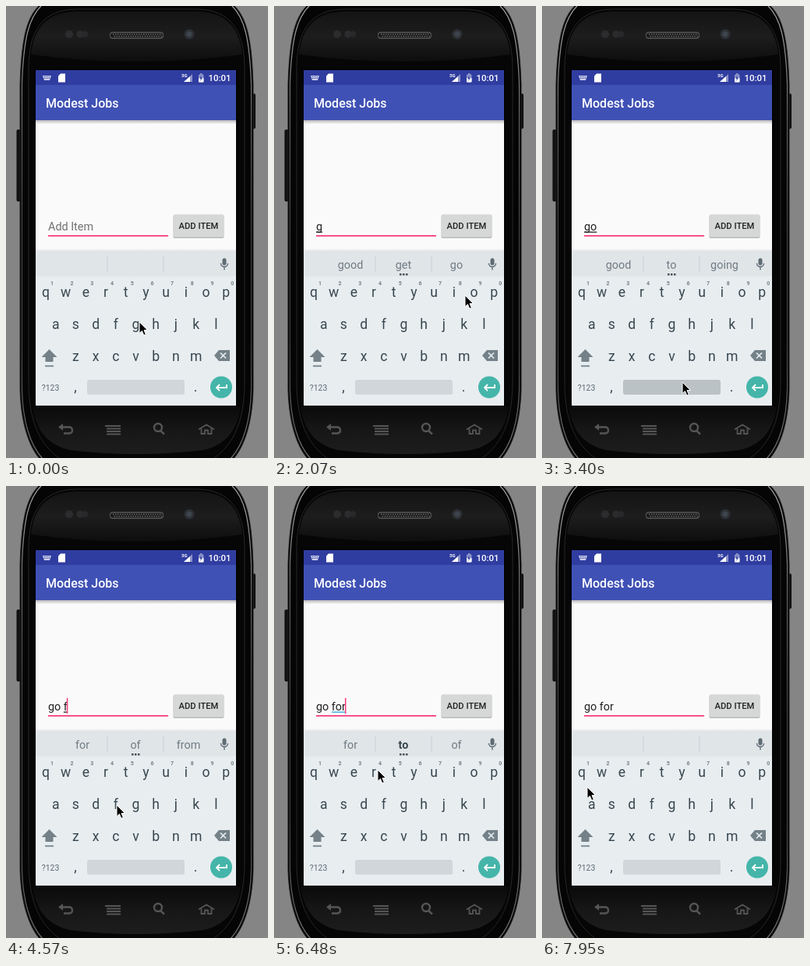
An HTML page with a canvas that plays this animation: 336x578 px, repeating every 8000 ms.

```html
<!DOCTYPE html>
<html lang="en">
<head>
<meta charset="utf-8">
<title>Todo list typing</title>
<style>
html, body { margin: 0; width: 100%; height: 100%; overflow: hidden; background: #858585; }
canvas { display: block; }
</style>
</head>
<body>
<canvas id="stage" width="336" height="578"></canvas>
<script>
const c = document.getElementById('stage').getContext('2d');
const LOOP = 8000, STEP = 147.3, KEY_GAP = 25.7;
const INK = '#37474f', MUTED = '#6f7c83', ICON = '#748188', PINK = '#f83b7c';

// Pointer stops: step, x, y
const pointer = [
  [0, 171, 404], [2, 172, 405], [9, 172, 405], [14, 245, 370], [15, 251, 367],
  [17, 253, 367], [21, 180, 481], [24, 180, 481], [30, 142, 408], [31, 142, 408],
  [34, 257, 364], [36, 257, 364], [39, 121, 364], [41, 133, 363], [45, 133, 363],
  [46, 150, 443], [47, 178, 481], [49, 180, 482], [54, 58, 385]
];
// Step at which each text appears; its key is held during the step before
const typed = [[-4.3, ''], [9, 'g'], [17, 'go'], [24, 'go '], [30, 'go f'],
  [36, 'go fo'], [44, 'go for'], [49, 'go for ']];
const suggestions = [[0, ''], [10, 'good get go'], [18, 'good to going'], [24, ''],
  [31, 'for of from'], [37, 'for to of', true], [45, 'four for forget', true], [49, '']];
const rows = [['qwertyuiop', 50.9, 366], ['asdfghjkl', 63.7, 407], ['zxcvbnm', 89.4, 448]];

const latest = (list, n) => list.filter(e => e[0] <= n).pop();

function rect(x, y, w, h, color, r = 0) {
  c.fillStyle = color;
  c.beginPath();
  c.roundRect(x, y, w, h, r);
  c.fill();
}
function circle(x, y, r, color) {
  c.fillStyle = color;
  c.beginPath();
  c.arc(x, y, r, 0, 7);
  c.fill();
}
function text(s, x, y, size, color, align = 'center', weight = 400) {
  c.font = `${weight} ${size}px Roboto, sans-serif`;
  c.textAlign = align;
  c.fillStyle = color;
  c.fillText(s, x, y);
}
function shape(d, x, y, fill, stroke, width = 1) {
  const p = new Path2D(d);
  c.save();
  c.translate(x, y);
  if (fill) { c.fillStyle = fill; c.fill(p); }
  if (stroke) { c.strokeStyle = stroke; c.lineWidth = width; c.stroke(p); }
  c.restore();
}
function fade(x0, y0, x1, y1, ...colors) {
  const g = c.createLinearGradient(x0, y0, x1, y1);
  colors.forEach((color, i) => g.addColorStop(i / (colors.length - 1), color));
  return g;
}

function drawPhone() {
  rect(0, 0, 336, 578, '#858585');
  rect(13.5, 158, 6, 92, '#111', 2);
  rect(315, 112, 5, 45, '#111', 2);
  const body = 'M44-2C26 14 20 42 18 100V490C19 530 28 562 44 580H291C307 562 316 530 317 490V100C315 42 309 14 291-2Z';
  shape(body, 0, 0, '#050505', '#222');
  const rim = 'M47-2C29 14 22.5 42 20.5 100V490C21.5 530 31 562 48 580M288-2C306 14 312.5 42 314.5 100V490C313.5 530 304 562 287 580';
  shape(rim, 0, 0, null, fade(0, 0, 0, 578, '#aaa', '#666', '#444', '#444', '#777'), 1.2);
  const face = 'M29 80C29 30 48 4 92 4H243C287 4 306 30 306 80V480C306 535 290 572 245 590H90C45 572 29 535 29 480Z';
  shape(face, 0, 0, '#060606', '#262626');
  const forehead = 'M32 62C36 26 54 7 92 7H243C281 7 299 26 303 62Q168 80 32 62Z';
  shape(forehead, 0, 0, fade(0, 7, 0, 72, '#141414', '#1d1d1d', '#0d0d0d'));
  const chin = 'M34 512H301C296 545 280 562 252 568Q168 578 83 568C55 562 39 545 34 512Z';
  shape(chin, 0, 0, fade(0, 512, 0, 574, '#0a0a0a', '#171717', '#1d1d1d'));

  circle(81, 36, 5, '#2c2c2e');
  circle(95, 36, 4.5, '#2c2c2e');
  circle(101, 36, 4, '#29292b');
  rect(133, 33, 69, 9, '#555', 4);
  rect(134, 34.5, 67, 6, '#191919', 3);
  for (let x = 137; x < 199; x += 3) {
    rect(x, 35.5, 1.5, 1.5, '#666');
    rect(x + 1.5, 38, 1.5, 1.5, '#666');
  }
  circle(235, 36, 6.5, '#2d3035');
  circle(235, 36, 3.5, '#3c444c');

  const nav = '#555';
  shape('M-6-3.5H4Q8-3.5 8 0.5T4 4.5H-3', 77, 542, null, nav, 2.4);
  shape('M-10-3.5L-4-8V1Z', 77, 542, nav);
  for (let i = 0; i < 4; i++) rect(i ? 129 : 127, 536 + i * 3.5, i ? 18 : 20, 2, nav);
  shape('M5-2A5 5 0 1 1-5-2A5 5 0 1 1 5-2M3 2L8 6.5', 195, 541, null, nav, 2.4);
  shape('M-10 0L0-6L10 0M-6.5-1V5.5H-2V1H2V5.5H6.5V-1', 257, 541.5, null, nav, 1.8);
}

function drawApp() {
  rect(37, 81, 259, 431, '#000');
  rect(38, 82, 257, 429, '#fafafa');
  rect(38, 146, 257, 5, fade(0, 146, 0, 151, '#b8b8b8', '#fafafa'));
  rect(38, 82, 257, 20, '#303da0');
  rect(38, 101, 257, 45, '#3f51b5');
  text('Modest Jobs', 51, 130, 16, '#fff', 'left', 500);

  shape('M0 0H11L9 6H2Z', 47, 89, '#c9cde8');
  for (let x = 49; x < 56; x += 2) {
    rect(x, 90, 1, 1, '#303da0');
    rect(x, 92, 1, 1, '#303da0');
  }
  shape('M3 0H9V11H0V3Z', 67, 86.5, '#fff');
  text('3G', 225, 91, 6, '#fff', 'left', 700);
  shape('M0 10H11V0Z', 228, 87, '#8b92c9');
  shape('M0 10H8V3Z', 228, 87, '#fff');
  rect(247, 87.5, 6.5, 10, '#8b92c9', 1);
  rect(249, 86, 2.5, 2, '#8b92c9');
  rect(247, 92, 6.5, 5.5, '#fff', 1);
  shape('M2 0L0 4H1.5L1 7L3.5 3H2Z', 248.3, 89, '#303da0');
  text('10:01', 288.5, 96, 11.4, '#fff', 'right', 500);

  rect(214.5, 267, 65, 30, '#bcbcbc', 2);
  rect(215, 266.5, 64, 29, '#d6d7d7', 2);
  text('ADD ITEM', 247, 285, 11.2, '#212121', 'center', 500);
}

function drawField(n) {
  const [since, value] = latest(typed, n);
  const hint = latest(suggestions, n);
  if (value) text(value, 54, 287, 14.4, '#212121', 'left');
  else text('Add Item', 54, 286.5, 14.4, '#707070', 'left');
  c.font = '14.4px Roboto, sans-serif';
  const end = 54 + c.measureText(value).width;
  const wordStart = value.lastIndexOf(' ') + 1;
  const left = 54 + c.measureText(value.slice(0, wordStart)).width;
  if (end > left) rect(left, 288.5, end - left, 1.3, hint[2] ? '#2fa5dc' : '#222');
  rect(54, 293, 154, 1.7, PINK);
  if ((n - since) * STEP % 1000 < 500) rect(end - 1, 271, 1.5, 20, PINK);
}

function drawKeyboard(n) {
  const next = typed.find(e => e[0] === n + 1);
  const held = next ? next[1].slice(-1) : '';
  rect(38, 310, 257, 3, fade(0, 310, 0, 313, '#fafafa', '#e9ebec'));
  rect(38, 313, 257, 198, '#e8edf0');
  rect(38, 313, 257, 32.5, '#e0e5e8');
  rect(129.5, 320, 1, 20, '#c8d0d4');
  rect(201.5, 320, 1, 20, '#c8d0d4');

  const [, words, bold] = latest(suggestions, n);
  if (words) {
    words.split(' ').forEach((word, i) => {
      const strong = bold && i === 1;
      text(word, 98 + i * 68, 336, 14.4, strong ? INK : MUTED, 'center', strong ? 700 : 400);
    });
    for (const x of [161, 165, 169]) rect(x, 342, 2.5, 2.5, '#455056');
  }
  rect(277.5, 322.5, 5, 9, '#5f6c74', 2.5);
  shape('M-4.5-1A4.5 4.5 0 0 0 4.5-1M0 4V7.5', 280, 330, null, '#5f6c74', 1.4);

  rows.forEach(([letters, x0, y], row) => [...letters].forEach((letter, i) => {
    const x = x0 + i * KEY_GAP;
    text(letter, x, y + 6, 17.6, INK);
    if (row === 0) text((i + 1) % 10, x + 8, y - 9.5, 7, ICON, 'center', 700);
  }));

  shape('M0-9L10 1H5V7H-5V1H-10Z', 55.5, 448, ICON);
  rect(50, 459.5, 11, 1.8, ICON);
  shape('M-10 0L-4-7H10V7H-4Z', 277, 447, ICON);
  shape('M-2-3.5L5 3.5M5-3.5L-2 3.5', 277, 447, null, '#e8edf0', 1.7);
  text('?123', 57, 491.5, 10.4, '#5b6a72');
  text(',', 89, 493, 17.6, INK);
  text('.', 243, 493, 17.6, INK);
  rect(104, 478, 125, 19, held === ' ' ? '#bac2c6' : '#d0d6d9', 3);
  circle(276, 487.5, 14, '#45b5aa');
  shape('M7-4V0H-6M-2-4L-6 0L-2 4', 276, 488, null, '#fff', 1.8);

  for (const [letters, x0, y] of rows) {
    const i = held ? letters.indexOf(held) : -1;
    if (i < 0) continue;
    const x = x0 + i * KEY_GAP;
    rect(x - 20, y - 57, 40, 40, '#c9d0d4', 3);
    rect(x - 19, y - 57, 38, 38, '#f5f7f8', 3);
    text(held, x, y - 31, 22, INK);
  }
}

function drawPointer(n) {
  const i = Math.max(1, pointer.findIndex(p => p[0] >= n));
  const [n0, x0, y0] = pointer[i - 1], [n1, x1, y1] = pointer[i];
  const p = (n - n0) / (n1 - n0), e = p * p * (3 - 2 * p);
  const arrow = 'M0 0V14.5L3.4 11.4L5.8 17L8.3 16L6 10.5H10.5Z';
  shape(arrow, x0 + (x1 - x0) * e, y0 + (y1 - y0) * e, '#000', '#fff', 1);
}

function draw() {
  const n = Math.min(54, Math.floor((performance.now() % LOOP + 6) / STEP));
  drawPhone();
  drawApp();
  drawField(n);
  drawKeyboard(n);
  drawPointer(n);
  requestAnimationFrame(draw);
}
draw();
</script>
</body>
</html>
```
